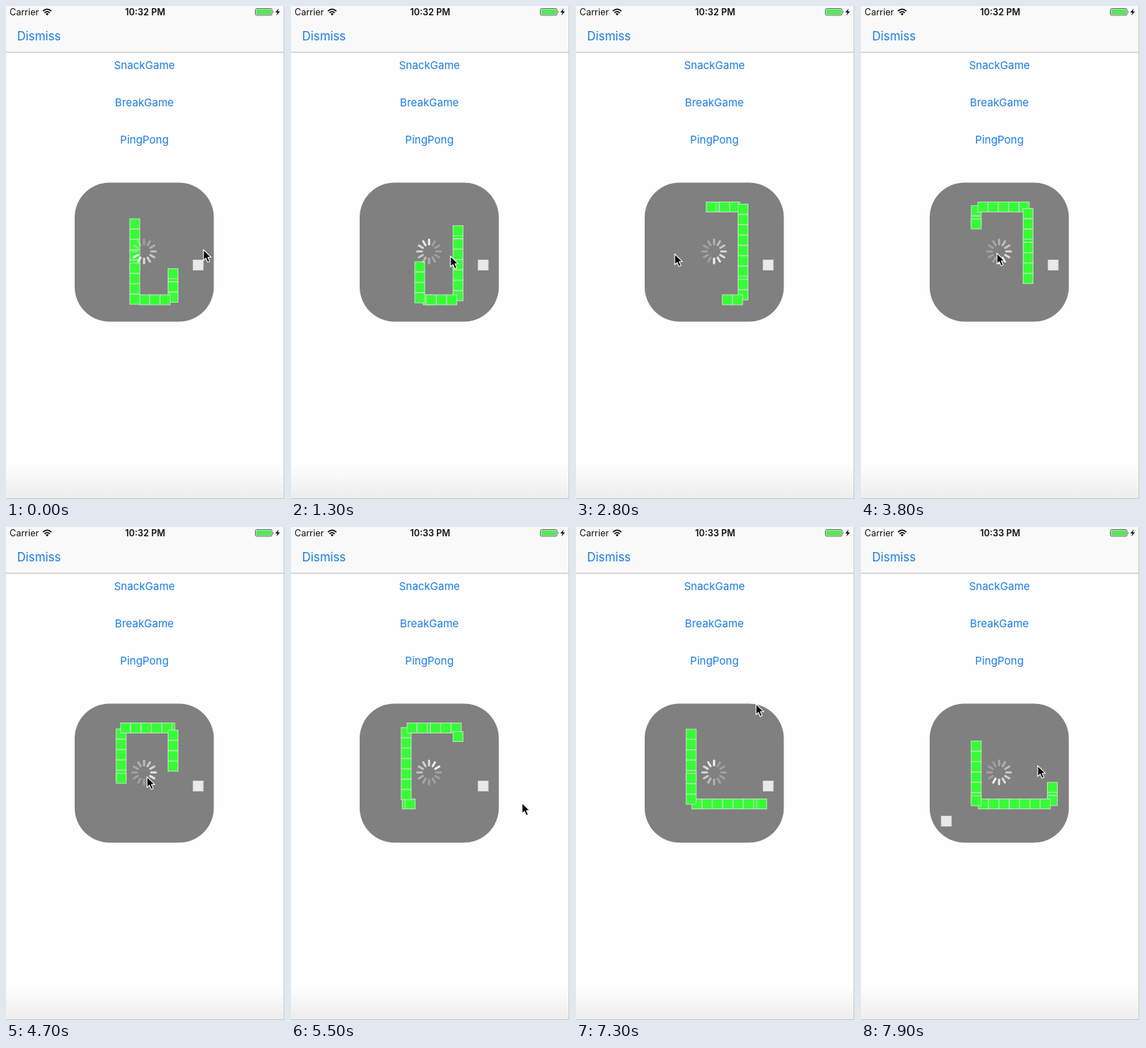
These frames come from a looping animation (390x688 px, 8000 ms). An HTML page:

```html
<!DOCTYPE html>
<html lang="en">
<head>
<meta charset="utf-8">
<title>Loading games</title>
<style>
  html, body { margin: 0; width: 100%; height: 100%; overflow: hidden; background: #fefefe; }
  svg { display: block; width: 390px; height: 688px; }
  text { font-family: Inter, Roboto, sans-serif; }
  .link { fill: #1c7ce5; font-size: 15px; }
  .mid { text-anchor: middle; }
  .status { font-size: 12.5px; fill: #111; }
  .cell { fill: #36fc36; stroke: #bfe3bf; }
  .food { fill: #e9e9e9; stroke: #dadada; }
</style>
</head>
<body>
<svg viewBox="0 0 390 688">
  <defs>
    <linearGradient id="fade" x1="0" y1="0" x2="0" y2="1">
      <stop offset="0" stop-color="#fefefe"/>
      <stop offset="1" stop-color="#ededed"/>
    </linearGradient>
  </defs>
  <rect width="390" height="688" fill="#fefefe"/>
  <rect y="640" width="390" height="47" fill="url(#fade)"/>
  <rect width="390" height="64" fill="#f9f9f9"/>
  <rect y="64" width="388" height="1" fill="#bcbcbc"/>
  <rect y="687" width="390" height="1" fill="#c4c4c4"/>
  <rect x="388" width="1" height="688" fill="#c6c6c6"/>
  <rect x="389" width="1" height="688" fill="#f0f0f0"/>

  <text class="status" x="5" y="13">Carrier</text>
  <g fill="none" stroke="#111" stroke-width="1.8">
    <path d="M51.6 7.2 Q57.5 1.6 63.4 7.2"/>
    <path d="M53.8 9.6 Q57.5 6.2 61.2 9.6"/>
  </g>
  <path d="M55.4 11 Q57.5 9.2 59.6 11 L57.5 13.2Z" fill="#111"/>
  <text id="clock" class="status mid" x="194.5" y="13" font-weight="600"></text>
  <rect x="348.5" y="3.5" width="23.5" height="9.5" rx="2" fill="#fff" stroke="#555" stroke-width=".9"/>
  <rect x="349.5" y="4.5" width="21.5" height="7.5" rx="1" fill="#58e65c"/>
  <path d="M373 6.5 q1.6 1.7 0 3.6z" fill="#444"/>
  <path d="M381 3.5 L376.5 9 H379.4 L378 13.3 L383 7.6 H380z" fill="#111"/>

  <text class="link" x="15.5" y="47.5" style="font-size:16.7px">Dismiss</text>
  <text class="link mid" x="193.5" y="88">SnackGame</text>
  <text class="link mid" x="193.5" y="140">BreakGame</text>
  <text class="link mid" x="193.5" y="192">PingPong</text>

  <rect x="96" y="246.5" width="194.5" height="194" rx="48.5" fill="#808080"/>
  <g id="board"></g>
  <g id="spinner" transform="translate(193 342.5)" stroke="#fff" stroke-width="3" stroke-linecap="round"></g>
  <path id="cursor" d="M0 0 V15 L3.4 11.8 L5.9 17.6 L8.7 16.4 L6.2 10.8 H10.8Z" fill="#050505" stroke="#fff" stroke-width="1.1" stroke-linejoin="round"/>
</svg>
<script>
const LOOP = 8000, TICK = 100;
const CELL = 14.45, OVERLAP = 4.1, LENGTH = 15;
const SPEED = 0.0517, HEAD_START = 210, STALL = 140;
const EAT = 7700, MINUTE = 5000;

// The snake's route: legs alternate between vertical and horizontal.
const origin = [180, 290];
const legs = [120, 53.5, -129.5, -72.5, 106, 106.5, -86.5];

// Pauses and swipe ends of the pointer: time, x, y.
const stops = [[0, 276, 340], [500, 291, 354], [1300, 223, 349], [2200, 11, 424],
  [2800, 138, 346], [3400, 175, 405], [3800, 190, 345], [5200, 200, 350],
  [5500, 323, 385], [6600, 249, 399], [7500, 252, 225], [7900, 247, 333]];

const $ = id => document.getElementById(id);

function add(parent, tag, attrs) {
  const el = document.createElementNS("http://www.w3.org/2000/svg", tag);
  for (const k in attrs) el.setAttribute(k, attrs[k]);
  return parent.appendChild(el);
}

const addBlock = kind => add($("board"), "rect", { class: kind, x: -7, y: -7, width: 14, height: 14 });

function place(el, [x, y]) {
  el.setAttribute("transform", `translate(${x} ${y})`);
}

function pointAt(dist) {
  const p = [...origin];
  legs.forEach((leg, i) => {
    const step = Math.min(dist, Math.abs(leg));
    p[(i + 1) % 2] += Math.sign(leg) * step;
    dist -= step;
  });
  return p;
}

function pointerAt(t) {
  const i = Math.max(1, stops.findIndex(s => s[0] >= t));
  const [t0, x0, y0] = stops[i - 1], [t1, x1, y1] = stops[i];
  const k = (t - t0) / (t1 - t0), e = k * k * (3 - 2 * k);
  return [x0 + (x1 - x0) * e, y0 + (y1 - y0) * e];
}

// Two tucked cells sit beneath the body, behind its first and tenth cells.
const bodyLag = i => i * CELL + (i > 0) * OVERLAP + (i > 9) * OVERLAP;
const lags = [0, 9].map(i => bodyLag(i) + OVERLAP);
for (let i = 0; i < LENGTH; i++) lags.push(bodyLag(i));

const food = addBlock("food");
const cells = lags.map(() => addBlock("cell"));
const tail = cells[cells.length - 1];
const spokes = Array.from({ length: 12 }, (_, i) =>
  add($("spinner"), "line", { y1: -10, y2: -16.5, transform: `rotate(${i * 30})` }));

function draw(t) {
  const head = HEAD_START + SPEED * Math.max(0, t - STALL);
  cells.forEach((cell, i) => place(cell, pointAt(head - lags[i])));

  const eaten = t >= EAT;
  tail.style.display = eaten ? "" : "none";
  place(food, eaten ? [119.2, 410.5] : [268.7, 361.5]);

  const lead = Math.round((t / 1000 + 0.7) * 12);
  spokes.forEach((spoke, i) => {
    const age = (lead - i + 24) % 12;
    spoke.setAttribute("stroke-opacity", Math.max(0.25, 0.9 - age * 0.085));
  });

  place($("cursor"), pointerAt(t));
  $("clock").textContent = t < MINUTE ? "10:32 PM" : "10:33 PM";
}

const start = performance.now();
function frame() {
  const t = (performance.now() - start) % LOOP;
  draw(Math.floor(t / TICK) * TICK);
  requestAnimationFrame(frame);
}
frame();
</script>
</body>
</html>
```
